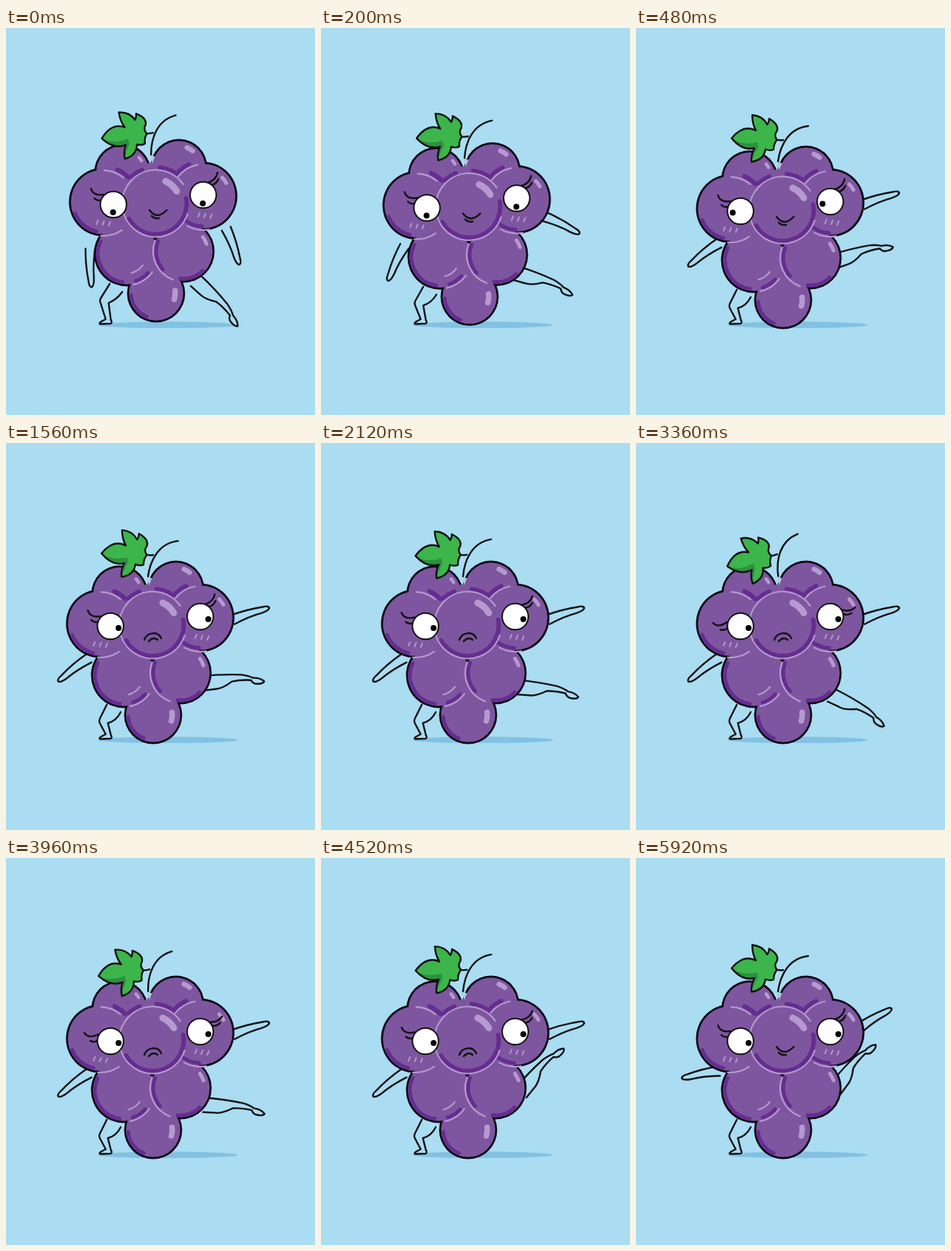
Write an HTML page that moves like this. It is 420 by 525 pixels and loops after 5960 ms.

```html
<!DOCTYPE html>
<html lang="en">
<head>
<meta charset="utf-8">
<title>Dancing grapes</title>
<style>
html, body { margin: 0; width: 100%; height: 100%; overflow: hidden; background: #aadcf2; }
svg { display: block; width: 100vw; height: 100vh; }
.line { fill: none; stroke: #111; stroke-width: 2.4; stroke-linecap: round; stroke-linejoin: round; }
.arc { fill: none; stroke-linecap: round; }
</style>
</head>
<body>
<svg viewBox="0 0 420 525">
  <defs>
    <path id="arm" d="M2 -7Q24 -8 46 -4.500Q55 -4 54.500 0Q52 3 42 3Q26 2 3 6"/>
  </defs>
  <ellipse cx="220" cy="402.800" rx="95" ry="4.300" fill="#82c1e1"/>
  <g class="line" stroke-width="2.200">
    <use id="armL" href="#arm"/>
    <use id="armR" href="#arm"/>
    <path id="stand"/>
    <path id="kick" d="M7 -9.500Q36 -12 62 -10.500Q72 -9 78 -6Q88 -6 93 -1Q91 3 81 2Q77 1 75 -3Q60 -4 49 -1.500Q36 8 27 8.200L10 10"/>
  </g>
  <g id="body">
    <g id="grapes"></g>
    <path fill="#b9c4e6" d="M192 183L195 193L198.500 183Z"/>
    <g id="shine"></g>
    <path id="lashL" class="line" d="M111.500 227Q114 237 129 235M116 240Q120 244 126 242.500"/>
    <path id="lashR" class="line" d="M270 219Q282 215 283.500 205M275 222Q282 221 284.500 214"/>
    <g fill="#fff" stroke="#111" stroke-width="2">
      <circle cx="142" cy="248.500" r="17.800"/><circle cx="264" cy="235.500" r="17.800"/>
    </g>
    <g id="pupils">
      <circle cx="142.500" cy="249" r="4"/><circle cx="264.500" cy="237" r="4"/>
    </g>
    <path id="mouth" class="line"/>
    <g id="top">
      <path class="line" d="M193 181C196 160 207 136 234 133M186 150Q192 153 200 152"/>
      <path id="leaf" fill="#3cb54a" d="M130 149.500Q146 130 163 139Q158 130 158 118Q172 119 178.500 131Q181 127 181 123Q195 131 191.500 140Q187 145 191.500 152Q187 157 187 165Q182 167 176 164.500Q174 179 157 181.500Q156 172 161 163Q144 167 130 149.500Z"/>
      <path fill="#2c9140" d="M131 150.500Q146 160 165 155L166 162Q161 170 157 181Q156 172 161 163Q144 167 131 150.500Z"/>
      <use href="#leaf" class="line" style="fill-opacity:0"/>
    </g>
  </g>
</svg>
<script>
const LOOP = 5960, STEP = 40;
const $ = id => document.getElementById(id);
const FILL = '#7e569f', DARK = '#652d90', LILAC = '#b69acf';

// Grapes: centre x, centre y, radius
const G = {
  topL: [154.5, 204.5, 37], topR: [231, 198, 37],
  left: [128, 245, 45], right: [264, 237, 45],
  midL: [160, 315, 43], midR: [237, 312, 41],
  bottom: [200, 369, 38], centre: [199.5, 247, 46]
};
const disc = ([x, y, r], color, grow) => `<circle cx="${x}" cy="${y}" r="${r + grow}" fill="${color}"/>`;
const all = Object.values(G);
const cores = [[195, 206, 16], [197, 320, 25]];
$('grapes').innerHTML =
  all.map(g => disc(g, '#0c0812', 1.5)).join('') +
  [...all, ...cores].map(g => disc(g, FILL, -1.2)).join('');

function arc(name, r, from, to, width, color) {
  const [x, y] = G[name];
  const at = deg => {
    const a = deg * Math.PI / 180;
    return `${x + r * Math.cos(a)} ${y + r * Math.sin(a)}`;
  };
  return `<path class="arc" stroke="${color}" stroke-width="${width}" ` +
    `d="M${at(from)}A${r} ${r} 0 ${to - from > 180 ? 1 : 0} 1 ${at(to)}"/>`;
}
const dark = (name, r, from, to, width = 6) => arc(name, r, from, to, width, DARK);
const pale = (name, r, from, to, width = 2.2) => arc(name, r, from, to, width, LILAC);
const blush = (x, y) => [0, 1, 2].map(i =>
  `<path class="arc" stroke="${LILAC}" stroke-width="2" d="M${x + 8.3 * i} ${y + i}l-2 5"/>`).join('');

$('shine').innerHTML = [
  dark('left', 41, 103, 158, 5), dark('midL', 39, 98, 205, 5), dark('bottom', 34, 112, 176, 5),
  dark('centre', 42, -10, 150), dark('centre', 49, -132, -112), dark('centre', 49, -84, -52),
  dark('left', 48, -66, -44), dark('right', 47, -134, -114),
  dark('right', 41, 92, 132, 5), dark('midR', 37, 138, 202, 5), dark('midR', 37, 45, 96, 5),
  dark('midL', 39, 42, 72, 5),
  pale('centre', 45.5, 18, 325), pale('left', 43, -88, -50), pale('right', 43, -142, -100),
  pale('left', 46, 56, 94), pale('right', 46, 80, 118), pale('midR', 41, 110, 200),
  pale('midL', 43, 36, 78), pale('midL', 27, 36, 76),
  pale('centre', 33, -66, -30, 9), pale('topL', 30, -42, -31, 4.5), pale('topR', 29, -68, -50, 6.5),
  pale('right', 36, -44, -29, 5), pale('midR', 33, -36, -18, 5), pale('bottom', 26, -8, 18, 7.5),
  blush(121, 270), blush(259, 260)
].join('');

// Keys are [time, values, eased?]; easing applies to the stretch ending at that key.
function track(keys, t) {
  const i = keys.findIndex(k => k[0] > t);
  if (i < 0) return keys[keys.length - 1][1];
  if (i === 0) return keys[0][1];
  const [t0, a] = keys[i - 1], [t1, b, eased] = keys[i];
  let u = (t - t0) / (t1 - t0);
  if (eased) u = u * u * (3 - 2 * u);
  return a.map((v, n) => v + (b[n] - v) * u);
}

// Limbs: joint x, joint y, angle
const armLKeys = [
  [0, [115, 297, 92]], [400, [115, 291, 37], 1], [4560, [115, 291, 37]],
  [4780, [116, 289, 11], 1], [5080, [115, 290, 30], 1], [5380, [116, 289, 11], 1]
];
const armRKeys = [
  [0, [298, 270, 70]], [400, [306, 241, -18], 1], [4560, [306, 241, -18]],
  [4780, [306, 241, 0], 1], [5080, [301, 233, -31], 1]
];
const legUp = [265, 325, -45], legTop = [263, 322, -47];
const kickKeys = [
  [0, [252, 336, 48]], [440, [259, 319, -13], 1], [520, [259, 319, -13]],
  [1560, [258, 326, -1]], [2680, [258, 333, 21]], [3360, [257, 337, 31]], [3680, [257, 337, 33]],
  [4440, legUp, 1], [4560, legUp], [5000, legTop, 1], [5440, legUp, 1], [5880, legTop, 1]
];
const liftKeys = [[0, [1]], [400, [0], 1]];
const strainKeys = [
  [1520, [0]], [2440, [5]], [2680, [8.6]], [3360, [15.6]], [3640, [16.5]],
  [4200, [5], 1], [4520, [3]], [4760, [0], 1]
];
const pupilKeys = [
  [200, [-1, 10]], [400, [-11, 1.5], 1], [840, [-11, 1.5]], [1040, [10.5, 2], 1]
];
const SMILE = 'M191 256Q201 270 214.5 256M194 264Q198 268.5 204 267';
const FROWN = 'M188 267C192 256 207 255 211 265M194 269Q200 262 206 267';

const set = (id, name, value) => $(id).setAttribute(name, value);
const move = (id, value) => set(id, 'transform', value);
const joint = ([x, y, angle], side = 1) => `translate(${x} ${y}) scale(${side} 1) rotate(${angle})`;

// The foot stays put while hip and knee follow the body.
const standingLeg = lift =>
  `M${137 + 4 * lift} ${355 - 8 * lift}L${127.5 + lift} ${374 - 7 * lift}` +
  `q-1.500 3 0 6L135.500 395L129 398.500Q125 402 130 401.500L142 401Q145 400 142.500 396` +
  `L${138.5 + lift} ${380 - 7 * lift}Q${150 + lift} ${377 - 9 * lift} ${156 + 2 * lift} ${365 - 7 * lift}`;

function render(t) {
  const [lift] = track(liftKeys, t), [strain] = track(strainKeys, t);
  move('armL', joint(track(armLKeys, t), -1));
  move('armR', joint(track(armRKeys, t)));
  move('kick', joint(track(kickKeys, t)));
  set('stand', 'd', standingLeg(lift));
  move('body', `translate(${4 * lift} ${-9 * lift})`);
  move('top', `rotate(${-8.3 * lift - strain} 192 180)`);
  move('lashL', `rotate(${-1.8 * strain} 142 249)`);
  move('lashR', `rotate(${2.4 * strain} 264 235)`);
  move('pupils', `translate(${track(pupilKeys, t)})`);
  set('mouth', 'd', t >= 960 && t < 4640 ? FROWN : SMILE);
}

const start = performance.now();
function tick() {
  const t = (performance.now() - start) % LOOP;
  render(Math.floor(t / STEP) * STEP);
  requestAnimationFrame(tick);
}
render(0);
requestAnimationFrame(tick);
</script>
</body>
</html>
```
